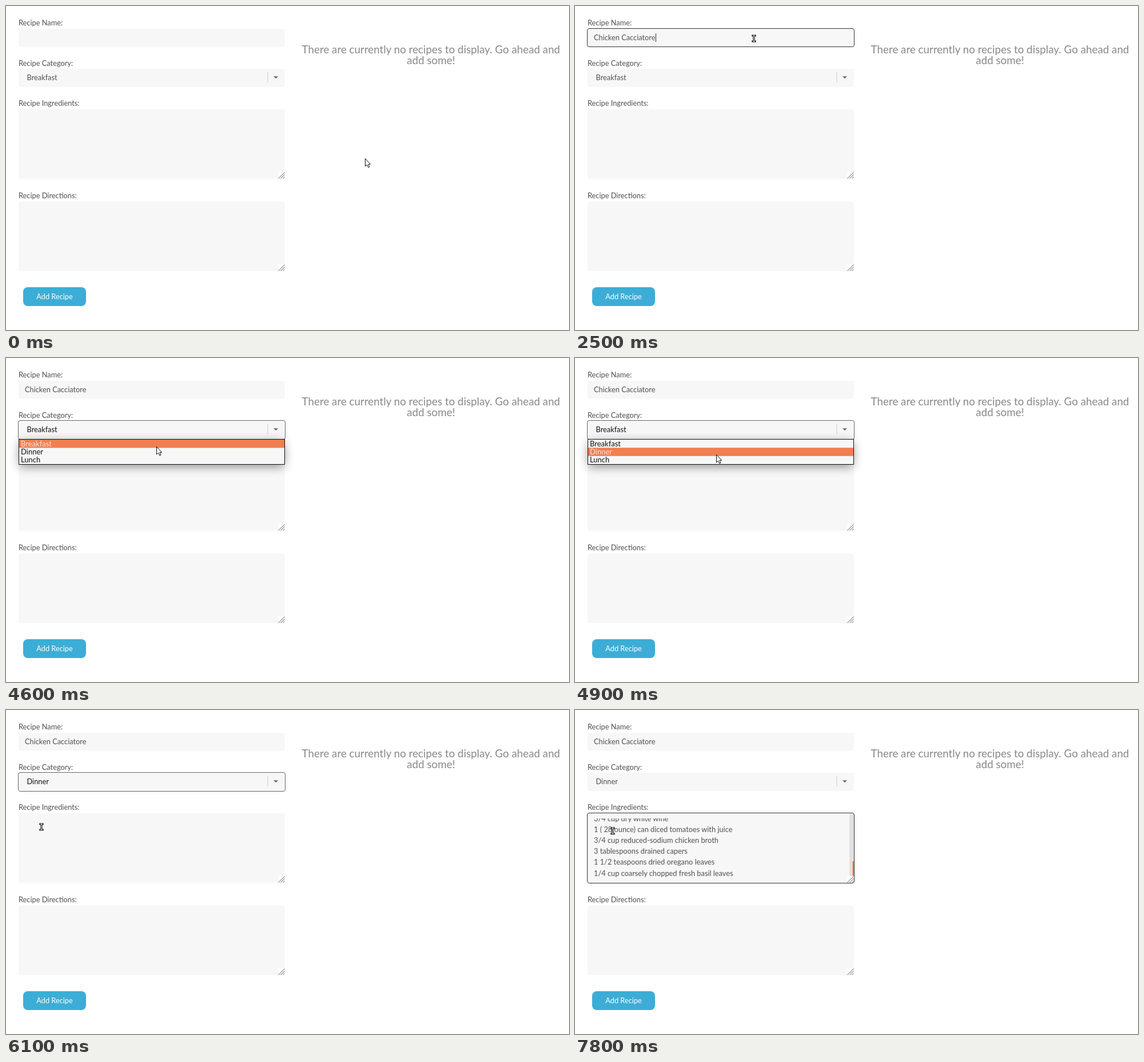
These frames come from a looping animation (985 px wide and 568 px high, 8000 ms). An HTML page:

```html
<!DOCTYPE html>
<html lang="en">
<head>
<meta charset="utf-8">
<title>Recipe form</title>
<style>
  html, body { margin: 0; width: 100%; height: 100%; overflow: hidden; background: #fff; }
  svg { display: block; width: 985px; height: 568px; }
  text { font: 12.8px Lato, "Open Sans", sans-serif; fill: #505050; white-space: pre; }
  .field { fill: #f7f7f7; }
  .focus { fill: none; stroke: #333; }
  .caret { stroke: #333; }
  .note { font-size: 18.8px; fill: #898989; text-anchor: middle; }
  #options text { font-size: 13px; fill: #111; }
  #options text.on { fill: #fbe3da; }
</style>
</head>
<body>
<svg viewBox="0 0 985 568">
  <defs>
    <filter id="blur" x="-10%" y="-100%" width="120%" height="300%">
      <feGaussianBlur stdDeviation="9"/>
    </filter>
    <clipPath id="area"><rect x="23" y="190" width="457" height="105"/></clipPath>
    <g id="grip">
      <path d="M0 0h11.5v12h-11.5z" fill="#fff"/>
      <path d="M0 11.5L11 .5M4 11.5L11 4.5M8 11.5L11 8.5" stroke="#999" stroke-width="1.1"/>
    </g>
  </defs>

  <text x="22" y="33.5">Recipe Name:</text>
  <text x="22" y="104.5">Recipe Category:</text>
  <text x="22" y="175">Recipe Ingredients:</text>
  <text x="22" y="336.5">Recipe Directions:</text>

  <rect class="field" x="22" y="40" width="466" height="31.5" rx="4"/>
  <rect class="field" x="22" y="110" width="466" height="32" rx="4"/>
  <rect class="field" x="22" y="181" width="466" height="122" rx="4"/>
  <rect class="field" x="22" y="343" width="466" height="122" rx="4"/>

  <text id="name" x="33" y="60">Chicken Cacciatore</text>
  <text id="category" x="36.5" y="130"></text>
  <path d="M458 116V134" stroke="#ccc"/>
  <path d="M468 123.3h8l-4 4z" fill="#666"/>

  <g id="pasted">
    <g id="lines" clip-path="url(#area)"></g>
    <path d="M480 182h8v109h-8z" fill="#e1e1e1"/>
    <path d="M485.5 265h2.5v25.5h-2.5z" fill="#f17f50"/>
  </g>
  <use href="#grip" x="476.5" y="291"/>
  <use href="#grip" x="476.5" y="453"/>

  <rect id="nameFocus" class="focus" x="21.5" y="39.5" width="467" height="32" rx="3.5"/>
  <rect id="selectFocus" class="focus" x="21.5" y="109.5" width="467" height="33" rx="3.5" style="stroke:#666"/>
  <rect id="areaFocus" class="focus" x="21.5" y="180.5" width="467" height="123" rx="3.5"/>
  <path id="caret" class="caret"/>

  <rect x="30" y="493" width="110" height="33" rx="8" fill="#3cadd6"/>
  <text x="85" y="514" text-anchor="middle" style="fill:#fff">Add Recipe</text>

  <text class="note" x="743.5" y="82.5">There are currently no recipes to display. Go ahead and</text>
  <text class="note" x="743.5" y="102">add some!</text>

  <g id="options">
    <rect x="24" y="148" width="462" height="42" opacity=".45" filter="url(#blur)"/>
    <rect x="22.5" y="142.5" width="465" height="44" fill="#f7f7f7" stroke="#111"/>
    <rect id="mark" x="23" y="143" width="464" height="14.5" fill="#f17f50"/>
    <text x="26" y="154.5">Breakfast</text>
    <text x="26" y="168.8">Dinner</text>
    <text x="26" y="183.1">Lunch</text>
  </g>

  <g id="pointer">
    <path id="arrow" d="M.5 .5V14L3.6 11.2 5.8 16 8 15 5.9 10.4H9.5Z" fill="#fff" stroke="#111"/>
    <g id="beam" fill="none">
      <path d="M-2-5H2M0-5V5M-2 5H2" stroke="#111" stroke-width="3.2" stroke-linecap="square"/>
      <path d="M-2-5H2M0-5V5M-2 5H2" stroke="#fff"/>
    </g>
  </g>
</svg>
<script>
const LOOP = 8000, STEP = 100;
const $ = id => document.getElementById(id);
const show = (id, on) => $(id).style.display = on ? "" : "none";

const ingredients = [
  "3/4 cup dry white wine",
  "1 ( 28 ounce) can diced tomatoes with juice",
  "3/4 cup reduced-sodium chicken broth",
  "3 tablespoons drained capers",
  "1 1/2 teaspoons dried oregano leaves",
  "1/4 cup coarsely chopped fresh basil leaves"
];
$("lines").innerHTML = ingredients
  .map((line, i) => `<text x="33" y="${194.5 + i * 19.2}">${line}</text>`).join("");
const lastLine = $("lines").lastElementChild;
const choices = [...document.querySelectorAll("#options text")];

// Pointer stops: time, x, y
const stops = [
  [100, 628, 267], [1000, 316, 58], [1100, 313, 57],
  [3200, 313, 57], [3800, 280, 129],
  [4300, 280, 129], [4600, 263, 155], [4900, 247, 169],
  [5700, 247, 169], [6200, 16, 214], [6400, 66, 212]
];

function pointerAt(t) {
  const next = stops.findIndex(s => s[0] > t);
  if (next === 0) return stops[0].slice(1);
  if (next < 0) return stops[stops.length - 1].slice(1);
  const [t0, x0, y0] = stops[next - 1], [t1, x1, y1] = stops[next];
  let k = (t - t0) / (t1 - t0);
  if (t < 1000) k = k * k * (3 - 2 * k);
  return [Math.round(x0 + (x1 - x0) * k), Math.round(y0 + (y1 - y0) * k)];
}

function drawCaret(t) {
  let x = 33.5, top = 48;
  const inName = t >= 1400 && t < 4000 && !(t >= 2600 && t < 3300);
  const inArea = t >= 6600 && t < 7800;
  if (inName && t >= 2500) x += $("name").getComputedTextLength() + .5;
  if (inArea) {
    top = t < 7700 ? 192 : 279;
    if (t >= 7700) x += lastLine.getComputedTextLength() + .5;
  }
  show("caret", inName || inArea);
  $("caret").setAttribute("d", `M${Math.floor(x) + .5} ${top}v15`);
}

function draw(now) {
  const t = Math.floor(now % LOOP / STEP) * STEP;
  const [x, y] = pointerAt(t);
  const open = t >= 4000 && t < 5400;
  const selectOn = t >= 4000 && t < 6200;

  show("name", t >= 2500);
  show("nameFocus", t >= 1400 && t < 4000);
  show("selectFocus", selectOn);
  show("areaFocus", t >= 6600);
  show("pasted", t >= 7700);
  show("options", open);
  $("category").textContent = t < 5400 ? "Breakfast" : "Dinner";
  $("category").style.fill = selectOn ? "#111" : "";

  const active = y > 157 ? 1 : 0;
  $("mark").setAttribute("y", 143 + active * 14.3);
  choices.forEach((c, i) => c.classList.toggle("on", i === active));
  drawCaret(t);

  const overText = x > 22 && x < 488 && (y > 40 && y < 72 || !open && y > 181 && y < 303);
  show("beam", overText);
  show("arrow", !overText);
  $("pointer").setAttribute("transform", `translate(${x} ${y})`);
}

const start = performance.now();
function frame() {
  draw(performance.now() - start);
  requestAnimationFrame(frame);
}
frame();
</script>
</body>
</html>
```
